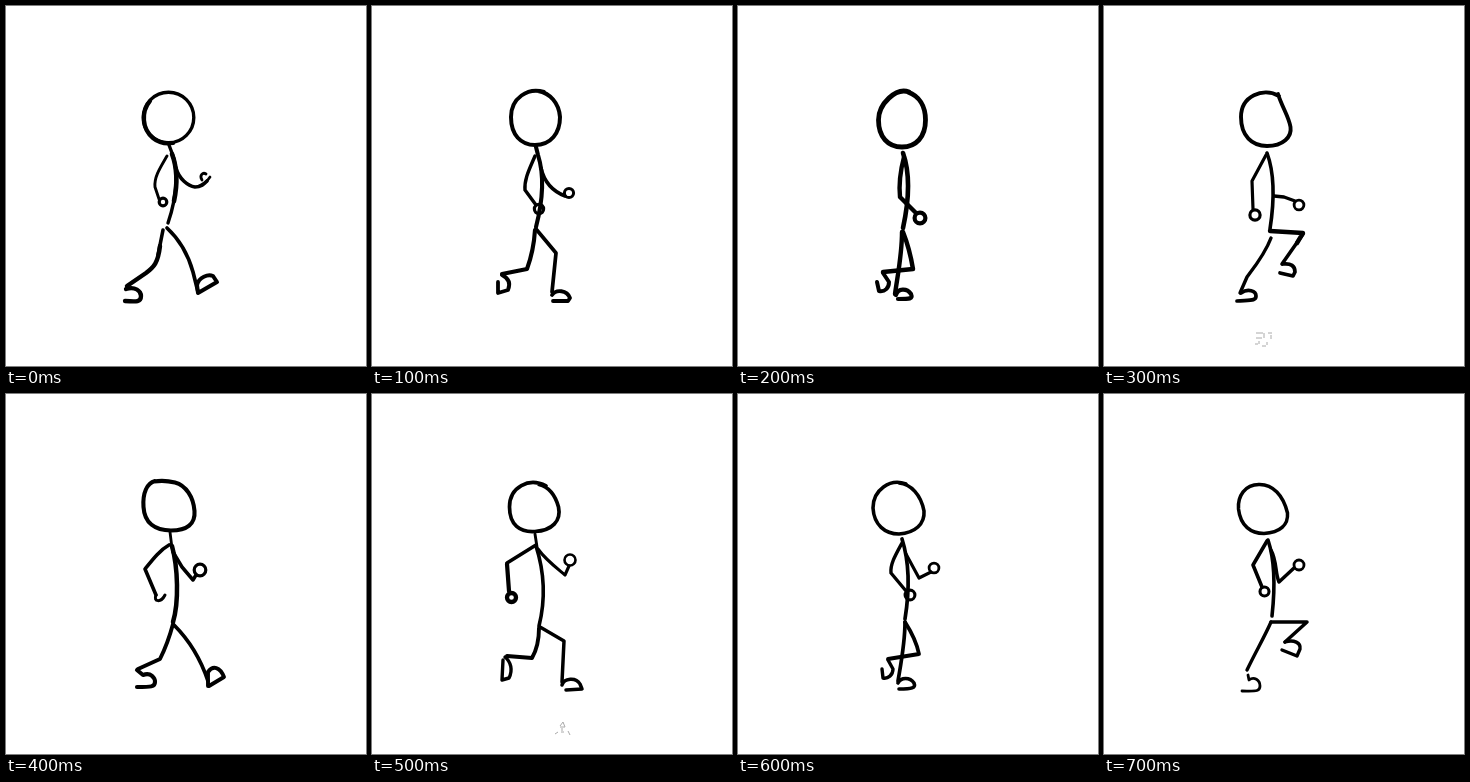
Recreate the animation shown at these times as an HTML page. Size 360 by 360 pixels, loop 0.8 s.

```html
<!DOCTYPE html>
<html lang="en">
<head>
<meta charset="utf-8">
<title>Walking stick figure</title>
<style>
  html, body { margin: 0; width: 100%; height: 100%; overflow: hidden; background: #fff; }
  svg { display: block; width: 100%; height: 100%; }
  path { fill: none; stroke: #000; stroke-linecap: round; stroke-linejoin: round; }
  .dust { stroke: #aaa; stroke-width: 1; stroke-linecap: butt; }
</style>
</head>
<body>
<svg viewBox="0 0 360 360"><g id="figure"></g></svg>
<script>
const STEP = 100;

// Path data for a hand or other small ring.
const ring = (x, y, r) => `M${x - r} ${y}a${r} ${r} 0 1 0 ${2 * r} 0a${r} ${r} 0 1 0 ${-2 * r} 0`;

// Each pose is a list of [stroke width, path data]; width 0 marks faint dust.
const poses = [
  [ // wide stride
    [3.4, ring(162.5, 111.5, 25.3)],
    [4.2, 'M144 95C135 106 136 123 147 132C153 137 160 138 167 137'],
    [3.4, 'M163 139L166 147C172 161 172 188 162 217'],
    [4.6, 'M166 148C172 164 171 181 168 195'],
    [2.9, 'M161 150C154 162 148 171 149 181L153 193'],
    [3.2, ring(157, 196, 3.8)],
    [3.6, 'M170 162C173 173 182 180 189 181C195 181 198 178 201 175'],
    [2.8, 'M196 174C193 169 197 166 200 168M201 175L204 171'],
    [3.6, 'M157 224L152 249'],
    [4.4, 'M154 240C152 257 148 261 140 267L121 280'],
    [4.3, 'M120 283C129 280 135 285 135 290C135 296 131 296 119 295'],
    [3.7, 'M161 222C174 234 182 248 187 266L192 286'],
    [4, 'M192 287L191 279C193 271 202 268 207 270L211 276L192 287']
  ],
  [ // weight on the front foot
    [4, 'M172 86C156 81 139 92 139 111C139 129 149 139 163 139C179 139 188 127 188 111C187 97 178 87 166 85'],
    [4.1, 'M164 141L166 149C172 168 171 194 164 221'],
    [3.4, 'M163 150C158 162 152 173 153 184L164 199'],
    [3.2, ring(167, 203, 4.6)],
    [3.5, 'M169 162C172 175 180 185 193 190'],
    [3, ring(197, 187, 4.6)],
    [3.7, 'M164 223L184 247L180 286'],
    [3.8, 'M180 289C184 283 195 284 198 292L196 295L181 295'],
    [4.1, 'M163 224C162 240 159 252 155 263L130 268'],
    [3.8, 'M130 269C136 272 139 277 136 284L126 287L126 276']
  ],
  [ // legs pass
    [4.8, 'M171 86C158 81 140.5 98 140.5 114C140.5 131 150 141 164 141C178 141 187.5 131 187.5 114C187.5 100 181 90 170 86'],
    [4.6, 'M165 147C171 164 172 190 165 222'],
    [4.4, 'M166 151C162 166 161 181 162 191L178 207'],
    [4.2, ring(182, 212, 5.4)],
    [4.4, 'M164 226C164 248 160 267 157 288'],
    [4.2, 'M158 289C160 282 169 282 173 288C175 293 172 293 160 293'],
    [4.5, 'M165 226C169 236 173 251 175 263L145 266'],
    [4, 'M145 267L151 276C151 282 147 286 141 285L139 276']
  ],
  [ // knee up
    [3.9, 'M175 90C159 81 137 90 137 111C137 130 148 140 163 140C179 140 188 131 186.5 121C185 111 178 101 174 88'],
    [3.6, 'M163 147C170 166 171 191 166 223'],
    [3.2, 'M162 149L148 175L149 203'],
    [3.2, ring(151, 209, 5.1)],
    [3.4, 'M170 190L180 191L191 195'],
    [2.8, ring(195, 199, 4.9)],
    [4.4, 'M166 225L199 227L193 237'],
    [3.6, 'M199 228L178 258'],
    [3.7, 'M179 258C187 257 191 260 191 266L189 270L176 267'],
    [3.4, 'M167 232C161 248 149 263 143 271L136 287'],
    [3.7, 'M137 287C144 282 152 285 152 290C152 295 147 294 133 295'],
    [0, 'M152 327h7M152 332h6M155 335v3M160 327v5M164 327h4M167 329v4M151 338h3M158 340h4M163 336v3']
  ],
  [ // opposite stride
    [4.1, 'M149 87C141 89 136.5 99 137.5 113C138.5 129 149 136.5 165 136.5C181 136.5 189.5 130 188.5 117C187.5 103 180 91.5 169 88.5C161 86.5 154 86.5 148 87.5'],
    [2.8, 'M164 138L166 154'],
    [4.5, 'M166 152C172 174 173 208 167 228'],
    [3.6, 'M163 151C154 156 147 165 139 175L150 201'],
    [3, 'M150 201C147 208 155 209 159 201'],
    [3.5, 'M167 158L176 173L187 186L190 181'],
    [3.2, ring(194, 176, 5.8)],
    [3.9, 'M167 230C163 245 159 255 154 265L132 275'],
    [4.1, 'M131 276L137 281C145 278 149 284 149 288C149 293 145 293 131 293'],
    [3.8, 'M168 231C184 247 195 266 202 287'],
    [3.9, 'M202 292L202 278C207 271 214 273 218 283L203 292']
  ],
  [ // opposite foot takes the weight
    [3.7, 'M174 92C157 83 137.5 93 137.5 113C137.5 131 148 138.5 163 137.5C180 136.5 189.5 127 186.5 113C183.5 102 177 93 167 90.5'],
    [2.9, 'M163 140L165 153'],
    [3.6, 'M164 152C173 180 173 208 167 232'],
    [3.7, 'M164 151L135 169'],
    [4.2, 'M135 170L137 197'],
    [4.3, ring(139.5, 203.5, 4.5)],
    [3.1, 'M166 155C173 165 181 171 193 181L197 172'],
    [2.6, ring(198, 166, 5.5)],
    [3.5, 'M168 233L192 247L190 288'],
    [3.5, 'M190 291C192 284 204 283 208 290L210 295L194 296'],
    [3.9, 'M167 234C167 247 164 257 160 264L135 262'],
    [3.4, 'M133 263C139 268 141 276 137 284L130 286L131 266'],
    [0, 'M188 332l3 -4l2 5h-5M190 334v3M183 340l3 -2M189 338h3M196 337l2 4']
  ],
  [ // legs pass again
    [3.6, 'M168 90C152 84 135 96 135 114C136 131 147 140 161 140C177 139 187 130 186 117C183 101 173 90 161 89'],
    [3.7, 'M164 145C171 167 172 194 167 225'],
    [3.4, 'M164 149C158 160 152 170 153 179L168 197'],
    [3.1, ring(172, 201, 4.9)],
    [3.2, 'M168 160L181 184L193 178'],
    [2.8, ring(196, 174, 4.9)],
    [3.7, 'M167 228C167 249 163 269 160 287'],
    [3.6, 'M160 289C163 283 172 283 176 289C178 294 174 295 161 295'],
    [3.8, 'M167 228C174 239 179 250 181 260L150 265'],
    [3.4, 'M150 266L155 275C155 281 150 285 145 284L144 275']
  ],
  [ // opposite knee up
    [3.5, 'M155 90.5C141 90.5 133.5 102 134.5 115C136.5 132 147 139.5 160 139.5C176 138.5 184.5 131 183.5 119C179.5 102 169 89.5 154 90.5'],
    [3.6, 'M164 146C171 167 171 195 168 222'],
    [3.6, 'M163 147L149 171L158 193'],
    [3.1, ring(160.5, 197.5, 4.5)],
    [3.5, 'M167 156C173 167 171 179 175 188L190 174'],
    [2.8, ring(195, 171, 5)],
    [3.5, 'M167 228L203 228L181 248'],
    [3.4, 'M181 248C190 245 197 249 196 255L193 262L178 256'],
    [3.4, 'M167 228C160 244 152 257 143 276'],
    [2.8, 'M144 281L145 286C150 282 156 286 156 292C156 298 151 297 138 297']
  ]
];

const figure = document.getElementById('figure');
const stroke = ([width, d]) =>
  width ? `<path stroke-width="${width}" d="${d}"/>` : `<path class="dust" d="${d}"/>`;
const drawings = poses.map(pose => pose.map(stroke).join(''));
let shown = -1;

function draw(time) {
  const index = Math.floor(time / STEP) % poses.length;
  if (index !== shown) {
    figure.innerHTML = drawings[index];
    shown = index;
  }
}

function tick(time) {
  draw(time);
  requestAnimationFrame(tick);
}

draw(0);
requestAnimationFrame(tick);
</script>
</body>
</html>
```
